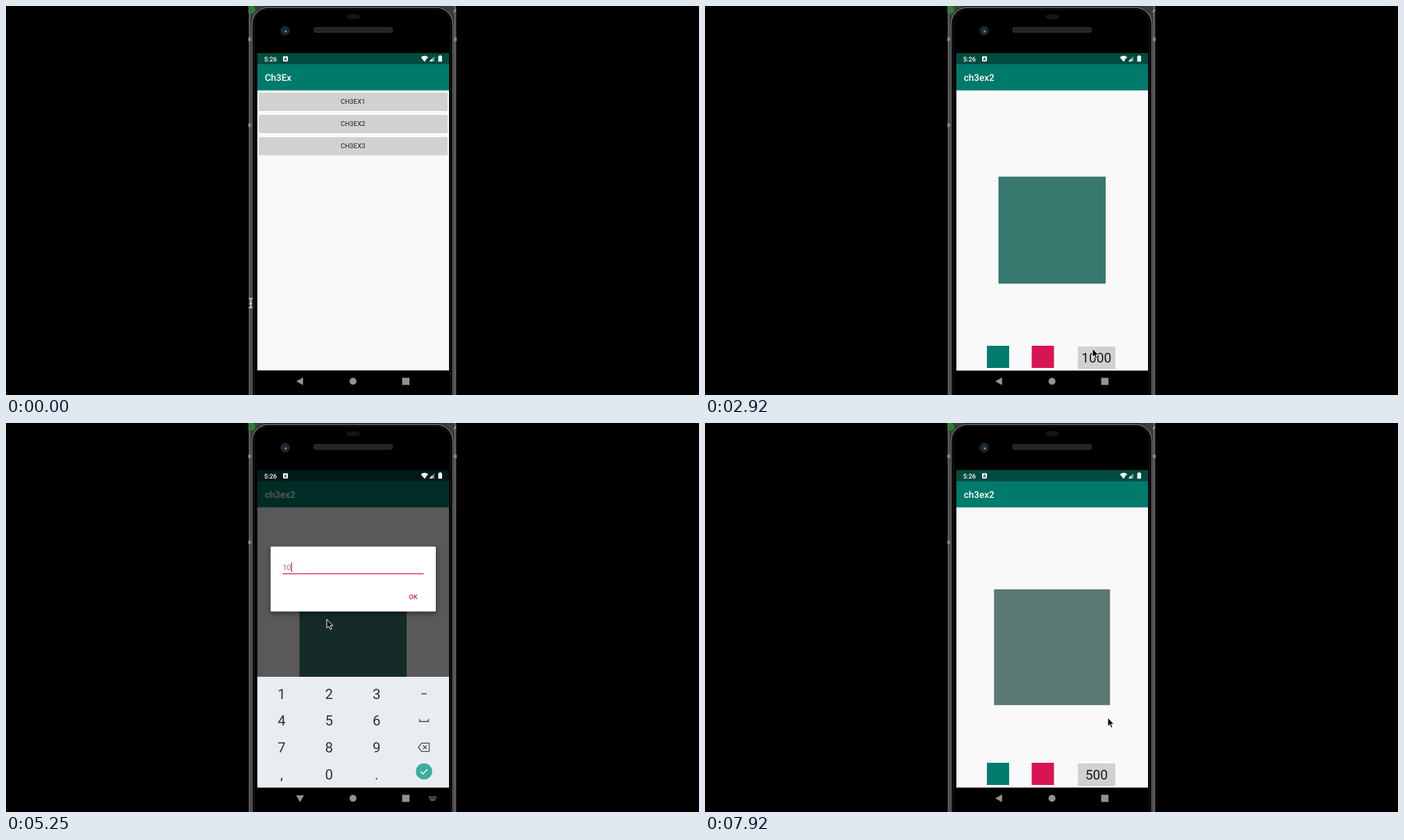
An HTML page that plays this animation: 998x561 px, repeating every 8000 ms.

```html
<!DOCTYPE html>
<html lang="en">
<head>
<meta charset="utf-8">
<title>Phone demo</title>
<style>
  html, body { margin: 0; width: 100%; height: 100%; overflow: hidden; background: #000; }
  svg { display: block; width: 998px; height: 561px; }
  text { font-family: Roboto, sans-serif; text-rendering: geometricPrecision; }
  .title { font-size: 13.5px; font-weight: 500; fill: #fff; }
  .mid { text-anchor: middle; }
  .label { font-size: 9.6px; fill: #1a1a1a; }
  .big { font-size: 19.1px; fill: #161616; }
  .key { font-size: 20.3px; fill: #26333a; }
</style>
</head>
<body>
<svg viewBox="0 0 998 561">
  <defs>
    <clipPath id="screen"><rect x="362" y="68" width="276" height="457.6"/></clipPath>
    <clipPath id="stage"><rect x="349" y="0" width="300" height="561"/></clipPath>
    <linearGradient id="edge">
      <stop offset="0" stop-color="#2c2c2c"/><stop offset=".45" stop-color="#747474"/><stop offset="1" stop-color="#1c1c1c"/>
    </linearGradient>
    <filter id="soft" x="-10%" y="-20%" width="120%" height="140%">
      <feDropShadow dx="0" dy="3" stdDeviation="4" flood-opacity=".45"/>
    </filter>
    <filter id="low" x="-5%" y="-10%" width="110%" height="130%">
      <feDropShadow dx="0" dy=".8" stdDeviation=".7" flood-opacity=".28"/>
    </filter>
  </defs>
  <rect width="998" height="561"/>

  <!-- phone body -->
  <g clip-path="url(#stage)">
    <rect x="349" width="300" height="561" fill="#080808"/>
    <path d="M353 0h24q-18 2-24 22zM645 0h-24q18 2 24 22z" fill="#3c3c3c"/>
    <rect x="349.3" width="4" height="561" fill="url(#edge)"/>
    <rect x="644.8" width="4" height="561" fill="url(#edge)"/>
    <path d="M349 48h4M349 172h4M645 48h4" stroke="#888" stroke-width="5"/>
    <rect x="354.3" y="1.8" width="289.4" height="600" rx="24" stroke="#686868" stroke-width="1.8"/>
    <rect x="357.5" y="4.500" width="283" height="600" rx="21" stroke="#1c1c1c"/>
    <path d="M349 0h5a5 5.5 0 0 1 0 11h-5z" fill="#2c7d36"/>
    <path d="M645 9l3-4" stroke="#aaa" stroke-width="1.5"/>
    <ellipse cx="500" cy="15.5" rx="10" ry="3.8" fill="#151515"/>
    <rect x="443.5" y="31" width="113" height="7" rx="2" fill="#242424" stroke="#343434"/>
    <circle cx="402" cy="35.5" r="6.2" fill="#1c242b" stroke="#2c3136"/>
    <circle cx="402.3" cy="36" r="2.8" fill="#173f50"/>
    <circle cx="403" cy="36.7" r="1.3" fill="#69a9b8"/>
  </g>

  <g clip-path="url(#screen)">
    <rect x="362" y="68" width="276" height="458" fill="#f9f9f9"/>
    <g id="list">
      <rect x="362" y="84" width="276" height="37.700" fill="#007a6b"/>
      <text class="title" x="372.7" y="108">Ch3Ex</text>
    </g>
    <g id="demo">
      <rect x="362" y="84" width="276" height="442" fill="#f9f9f9"/>
      <rect x="362" y="84" width="276" height="37.700" fill="#007a6b"/>
      <text class="title" x="372.7" y="108">ch3ex2</text>
      <rect id="box"/>
      <rect x="406" y="490" width="32" height="32" fill="#007b6c"/>
      <rect x="470.5" y="490" width="32" height="32" fill="#d81452"/>
      <rect id="btn" x="537" y="491" width="54" height="31" rx="1.2" fill="#d0d2d1" filter="url(#low)"/>
      <text id="count" class="big mid" x="563.8" y="513.9"></text>
    </g>
    <rect x="362" y="68" width="276" height="16" fill="#004c40"/>
    <rect id="dimUnder" x="362" y="68" width="276" height="458"/>
    <g id="keys"><rect x="362" y="366" width="276" height="162" fill="#e8edf0"/></g>
    <rect id="dimOver" x="362" y="68" width="276" height="458"/>
    <g id="dialog">
      <rect x="381" y="258" width="238" height="93.5" rx="1.5" fill="#fff" filter="url(#soft)"/>
      <text id="entry" x="398.5" y="292.2" font-size="10.8" fill="#777"></text>
      <rect x="398.5" y="296.5" width="203" height="1.3" fill="#d4204f"/>
      <rect id="caret" y="280.8" width="1.3" height="14" fill="#d4204f"/>
      <text class="mid" x="586.5" y="333.4" font-size="9.4" font-weight="500" fill="#d4204f">OK</text>
    </g>
    <g fill="#fff">
      <text x="371.7" y="79.6" font-size="9.3" font-weight="500">5:26</text>
      <rect x="399" y="72.5" width="7" height="7.5" rx="1"/>
      <path d="M400.8 78.6l1.7-4.4 1.7 4.4M401.4 77.2h2.2" stroke="#123" stroke-width=".9" fill="none"/>
      <path d="M597.5 74q5.3-4.6 10.6 0l-5.3 6.4z"/>
      <path d="M605 75.2l3 4M608 75.2l-3 4" stroke="#033" stroke-width="1"/>
      <path d="M609.5 80l7.5-7.5V80z" opacity=".45"/>
      <path d="M609.5 80l4.6-4.6V80z"/>
      <path d="M622.5 72.3h1.5v-1h2.6v1h1.4V80.3h-5.5z"/>
    </g>
  </g>

  <!-- navigation bar -->
  <g fill="#929292">
    <path id="back"/>
    <circle cx="499.7" cy="541.2" r="5"/>
    <rect x="570.5" y="536.2" width="10.5" height="10.3"/>
    <g id="kbd"><path d="M609 539.2h11M609 541.4h11" stroke="#929292" stroke-width="1.5" stroke-dasharray="1.5 .8"/><path d="M611 543h7v1.4h-7z"/></g>
  </g>

  <path id="beam" d="M349.5 421.5q3 0 3 2.5v9q0 2.5-3 2.5M355.5 421.5q-3 0-3 2.5M355.5 435.5q-3 0-3-2.5M350.5 429h4" fill="none" stroke="#eee" stroke-width="1.2"/>
  <path id="arrow" d="M0 0V12.6L2.8 10 4.9 14.6 7 13.7 5 9.2H8.8Z" stroke="#fff" stroke-width="1" stroke-linejoin="round"/>
</svg>
<script>
const LOOP = 8000, STEP = LOOP / 96;
const el = {};
document.querySelectorAll('[id]').forEach(n => el[n.id] = n);

const set = (n, attrs) => { for (const k in attrs) n.setAttribute(k, attrs[k]); };
function add(parent, tag, attrs, text) {
  const n = document.createElementNS('http://www.w3.org/2000/svg', tag);
  set(n, attrs);
  if (text) n.textContent = text;
  parent.append(n);
}

['CH3EX1', 'CH3EX2', 'CH3EX3'].forEach((name, i) => {
  const y = 125 + i * 32.1;
  add(el.list, 'rect', { x: 364, y, width: 272, height: 25, rx: 1.2, fill: '#d0d2d1', filter: 'url(#low)' });
  add(el.list, 'text', { class: 'label mid', x: 499.7, y: y + 16.2 }, name);
});

['123', '456', '789', ',0.'].forEach((row, r) => [...row].forEach((c, i) =>
  add(el.keys, 'text', { class: 'key mid', x: 397 + i * 68.3, y: 397.6 + r * 38.7 }, c)));
const ink = { fill: 'none', stroke: '#3b474d', 'stroke-width': 1.4 };
add(el.keys, 'path', { d: 'M598 390.5h8M595.5 427v3.5h13V427', ...ink });
add(el.keys, 'path', { d: 'M594 467.7l4.5-6h11v12h-11zM600.5 465l5.4 5.4M605.9 465l-5.4 5.4', ...ink, 'stroke-width': 1.2 });
add(el.keys, 'circle', { cx: 602, cy: 502.5, r: 11.8, fill: '#3dae9f' });
add(el.keys, 'path', { d: 'M597 502.7l3.4 3.4 6.6-6.7', ...ink, stroke: '#fff' });

// Each row: time, then one or more values
const pointer = [[0, 352, 428], [80, 360, 415], [750, 506, 172], [1080, 508, 174], [1650, 525, 340],
  [2333, 544, 461], [2917, 558, 494], [3420, 560, 500], [4167, 522, 434], [4800, 466, 290],
  [5250, 462, 283], [6350, 464, 284], [6850, 594, 249], [7083, 595, 249], [7917, 580, 425], [8000, 579, 429]];
const size = [[0, 137], [1040, 137], [2050, 267], [3050, 137], [4066, 267], [5115, 137],
  [6125, 267], [7050, 140], [7060, 137], [7532, 267], [8032, 137]];
const open = [[1080, 0], [1420, 1]];
const dim = [[3480, 0], [3700, .64], [7000, .64], [7083, .49], [7300, 0]];
const panel = [[3480, 0], [3700, 1], [7000, 1], [7083, .55], [7200, 0]];
const keysY = [[4330, 160], [4583, 0], [7000, 0], [7083, 1], [7300, 24]];
const keysFade = [[7000, 1], [7083, .93], [7300, 0]];
const typed = [[0, '1000'], [5050, '100'], [5220, '10'], [5390, '1'], [5560, ''], [5900, '5'], [6140, '50'], [6380, '500']];

function at(rows, t) {
  const i = rows.findIndex(r => r[0] > t);
  if (i === 0) return rows[0].slice(1);
  if (i < 0) return rows[rows.length - 1].slice(1);
  const a = rows[i - 1], b = rows[i], k = (t - a[0]) / (b[0] - a[0]);
  return a.slice(1).map((v, j) => v + (b[j + 1] - v) * k);
}
const step = (rows, t) => rows.filter(r => r[0] <= t).pop()[1];

// Blend in linear light
const teal = [0, 121, 107], pink = [230, 127, 158];
const blend = k => 'rgb(' + teal.map((a, i) =>
  Math.round(((1 - k) * a ** 2.2 + k * pink[i] ** 2.2) ** (1 / 2.2))) + ')';

function draw(t) {
  const [w] = at(size, t);
  const u = (w - 137) / 130;
  set(el.box, { x: 499.8 - w / 2, y: 323.3 - w / 2, width: w, height: w, fill: blend((1 - Math.cos(Math.PI * u)) / 2) });

  const [o] = at(open, t);
  set(el.demo, { opacity: o, transform: `translate(0 ${18 * (1 - o) ** 2})` });
  el.count.textContent = t < 7000 ? '1000' : '500';
  set(el.btn, { fill: t > 3240 && t < 3480 ? '#b4b6b5' : '#d0d2d1' });

  const closing = t >= 7000, [d] = at(dim, t);
  set(el.dimUnder, { opacity: closing ? 0 : d });
  set(el.dimOver, { opacity: closing ? d : 0 });
  const [ky] = at(keysY, t), [kf] = at(keysFade, t);
  set(el.keys, { opacity: t < 4330 ? 0 : kf, transform: `translate(0 ${ky})` });

  const text = step(typed, t);
  set(el.dialog, { opacity: at(panel, t)[0], transform: `translate(0 ${t < 4400 ? 0 : -79.7})` });
  el.entry.textContent = text;
  set(el.caret, { x: 398.6 + text.length * 6.06, opacity: closing ? 0 : 1 });

  const ime = t >= 3600 && t < 7050;
  set(el.back, { d: ime ? 'M417.8 537h11.4l-5.7 9.8z' : 'M418 541.2l9.8-5.5v11z' });
  set(el.kbd, { opacity: ime ? 1 : 0 });

  const [x, y] = at(pointer, t);
  set(el.beam, { opacity: t < 80 ? 1 : 0 });
  set(el.arrow, { opacity: t < 80 ? 0 : 1, transform: `translate(${x} ${y})` });
}

const start = performance.now();
function tick() {
  const t = (performance.now() - start) % LOOP;
  draw(Math.min(95, Math.floor((t + 3.4) / STEP)) * STEP);
  requestAnimationFrame(tick);
}
tick();
</script>
</body>
</html>
```
